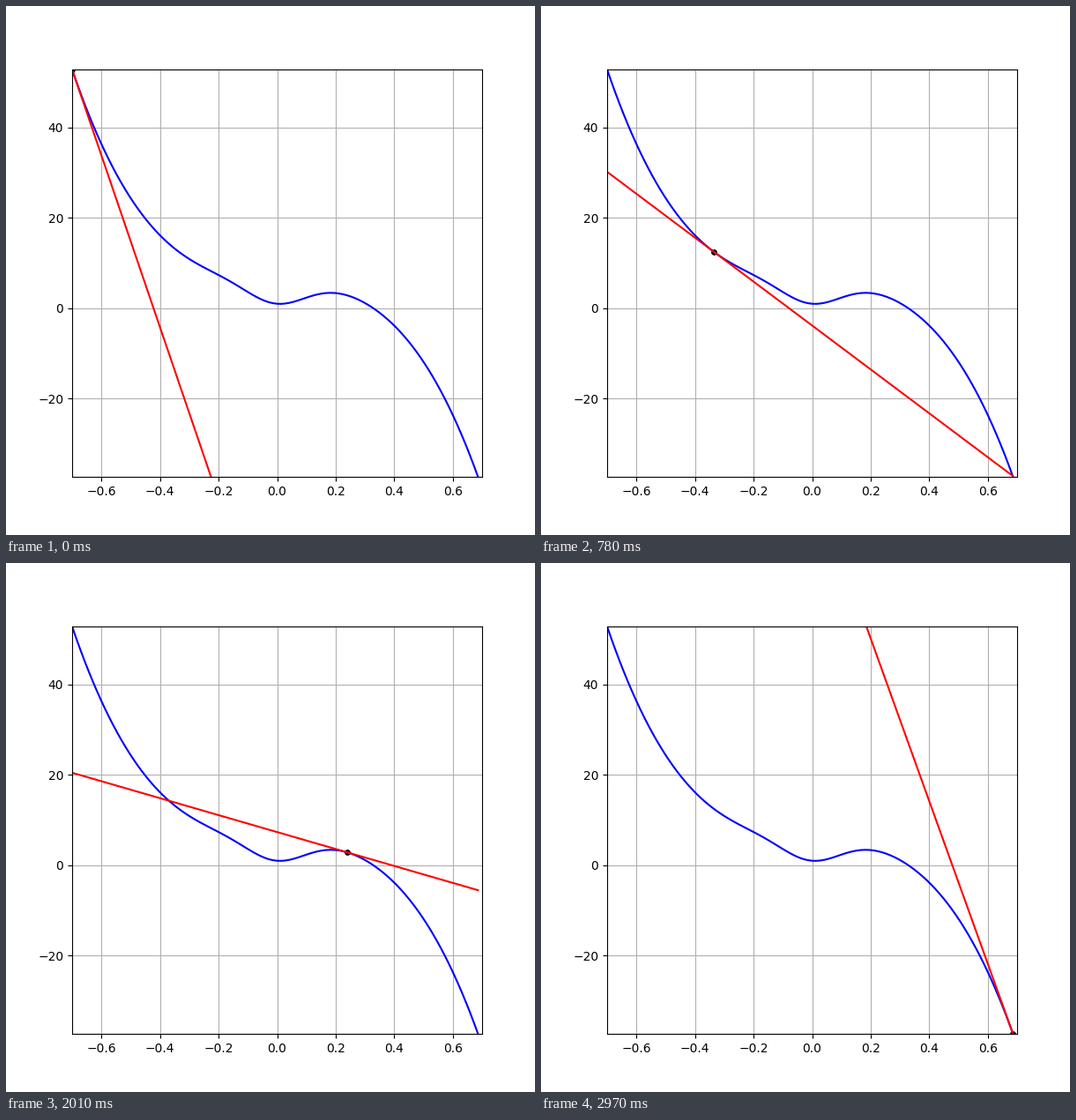
A matplotlib script for the animation above (3 s loop, 600x600 px).

```python
import matplotlib.pyplot as plt
import numpy as np
from matplotlib.animation import FuncAnimation

FRAMES = 100
LIMIT = 0.7


def curve(x):
    return -125 * x**3 + x**2 - 5 * x + 6 - 5 * np.exp(-50 * x**2)


def slope(x):
    return -375 * x**2 + 2 * x - 5 + 500 * x * np.exp(-50 * x**2)


xs = -LIMIT + 2 * LIMIT / FRAMES * np.arange(FRAMES)
ys = curve(xs)

fig, ax = plt.subplots(figsize=(6, 6), dpi=100)
ax.set_xlim(-LIMIT, LIMIT)
ax.set_ylim(ys.min(), ys.max())
ax.grid(True)

ax.plot(xs, ys, color="blue")
tangent, = ax.plot([], [], color="red")
point = ax.scatter([xs[0]], [ys[0]], s=15, color="black", zorder=1)


def update(i):
    x, y = xs[i], ys[i]
    tangent.set_data(xs, y + slope(x) * (xs - x))
    point.set_offsets([[x, y]])
    return tangent, point


anim = FuncAnimation(fig, update, frames=FRAMES, interval=30, repeat=True)
plt.show()
```
